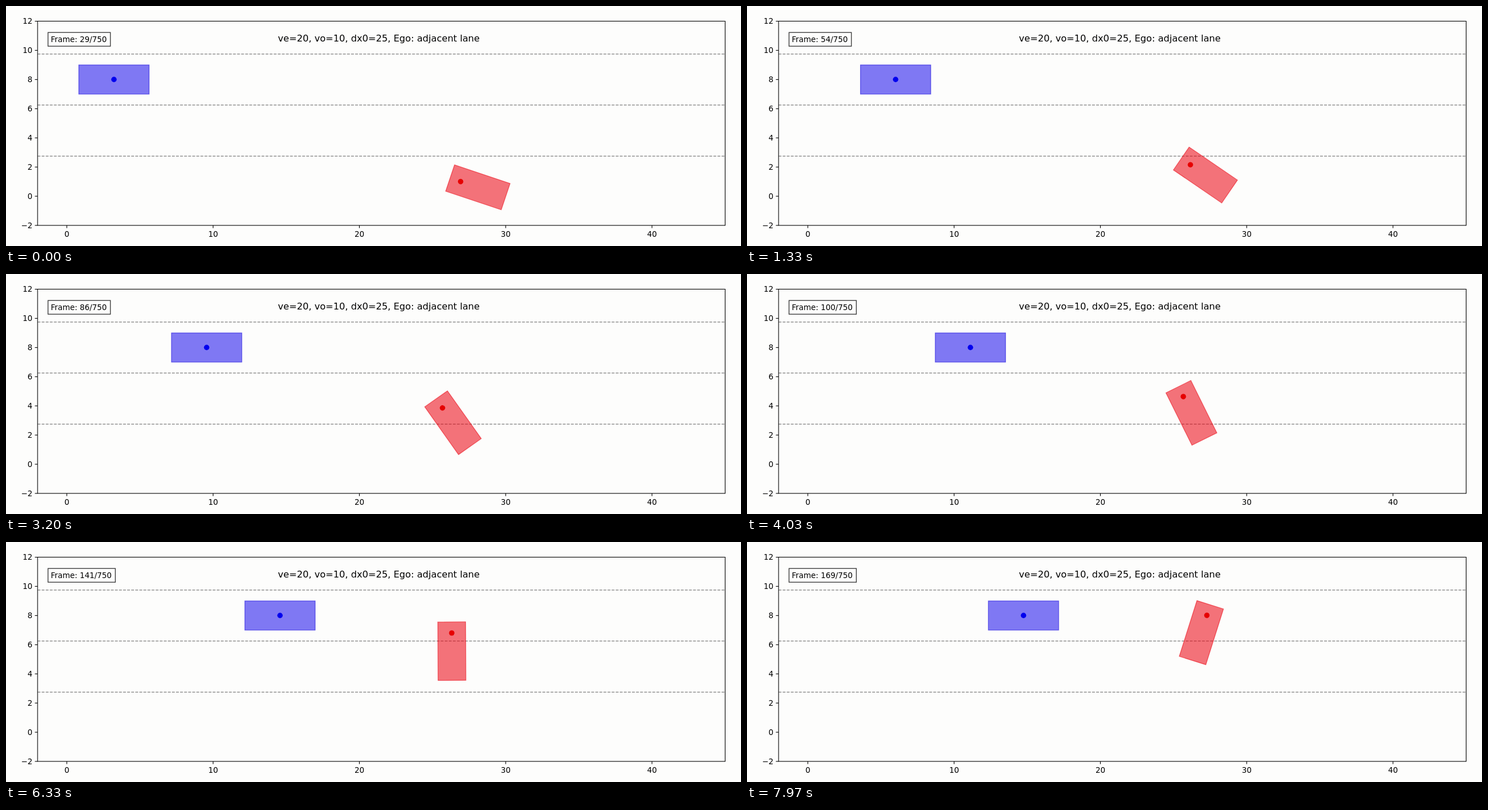
Animation of 1280 by 419 pixels, one loop 8000 ms. Source, as an HTML page:

```html
<!DOCTYPE html>
<html lang="en">
<head>
<meta charset="utf-8">
<title>Lane scene</title>
<style>
  html, body { margin: 0; width: 100%; height: 100%; overflow: hidden; background: #fdfdfc; }
  svg { display: block; width: 1280px; height: 419px; font: 13.4px "DejaVu Sans", sans-serif; }
  .axis { fill: none; stroke: #000; stroke-width: 1.1; }
  .lane { stroke: #7f7f7f; stroke-width: 1.3; stroke-dasharray: 4.95 2.14; }
  .blue { fill: rgba(16, 2, 237, .53); stroke: rgba(16, 2, 220, .53); stroke-width: 1.3; }
  .red { fill: rgba(235, 0, 16, .55); stroke: rgba(235, 0, 16, .55); stroke-width: 1.3; }
</style>
</head>
<body>
<svg viewBox="0 0 1280 419">
  <g id="plot"></g>
  <g id="blueCar">
    <rect class="blue" x="-61.2" y="102.9" width="122.4" height="50.9"/>
    <circle cy="128.3" r="4.7" fill="#00e"/>
  </g>
  <g id="redCar">
    <g transform="translate(-127.5 0) rotate(60.1)">
      <rect class="red" x="-19.3" y="-24.2" width="102" height="48.4"/>
      <circle r="4.7" fill="#e60000"/>
    </g>
  </g>
  <rect class="axis" x="55" y="26.5" width="1197.4" height="356.5"/>
  <rect id="box" x="73.2" y="46.2" width="108.6" height="24" fill="#fdfdfc" stroke="#333" stroke-width="1.3"/>
  <text id="label" x="78" y="62.5"></text>
  <text x="473.6" y="62" font-size="16.1">ve=20, vo=10, dx0=25, Ego: adjacent lane</text>
</svg>
<script>
const LOOP = 8000;
const $ = id => document.getElementById(id);
const plot = $('plot'), blueCar = $('blueCar'), redCar = $('redCar');
const box = $('box'), label = $('label');

function add(tag, attrs, text = '') {
  const el = document.createElementNS('http://www.w3.org/2000/svg', tag);
  for (const key in attrs) el.setAttribute(key, attrs[key]);
  el.textContent = text;
  plot.append(el);
}

const px = x => 105.9 + 25.477 * x;
const py = y => 332.1 - 25.464 * y;

for (let y = -2; y <= 12; y += 2) {
  add('path', { class: 'axis', d: `M50.3 ${py(y)}H55` });
  add('text', { x: 46, y: py(y) + 4.9, 'text-anchor': 'end' }, String(y).replace('-', '\u2212'));
}
for (let x = 0; x <= 40; x += 10) {
  add('path', { class: 'axis', d: `M${px(x)} 383V387.7` });
  add('text', { x: px(x), y: 402.9, 'text-anchor': 'middle' }, x);
}
for (const y of [9.75, 6.25, 2.75]) {
  add('path', { class: 'lane', d: `M55 ${py(y)}H1252.4` });
}

// Simulation step reached at each time (ms); the rate varies slightly.
const pace = [
  [0, 29.9], [1330, 54.3], [2330, 71.5], [4030, 100.6],
  [5170, 120.6], [6330, 141.3], [7970, 169.5], [8000, 169.95]
];

function stepAt(t) {
  const i = pace.findIndex(p => p[0] > t);
  const [t0, n0] = pace[i - 1], [t1, n1] = pace[i];
  return Math.floor(n0 + (n1 - n0) * (t - t0) / (t1 - t0));
}

// Constant speed, then progressive braking to a stop.
function blueX(n) {
  const m = Math.min(n, 150.7);
  const braking = Math.max(0, m - 103.76);
  return 188 + 2.832 * (m - 29) - 0.002304 * braking ** 2.6;
}

let shown = -1;
function draw(now) {
  const n = stepAt(now % LOOP);
  if (n !== shown) {
    shown = n;
    blueCar.setAttribute('transform', `translate(${blueX(n)} 0)`);
    redCar.setAttribute('transform', `translate(887.1 221.9) rotate(${0.6357 * (n - 94.4)})`);
    label.textContent = `Frame: ${n}/750`;
    box.setAttribute('width', n < 100 ? 108.6 : 117.2);
  }
}

const start = performance.now();
function tick() {
  draw(performance.now() - start);
  requestAnimationFrame(tick);
}
tick();
</script>
</body>
</html>
```
